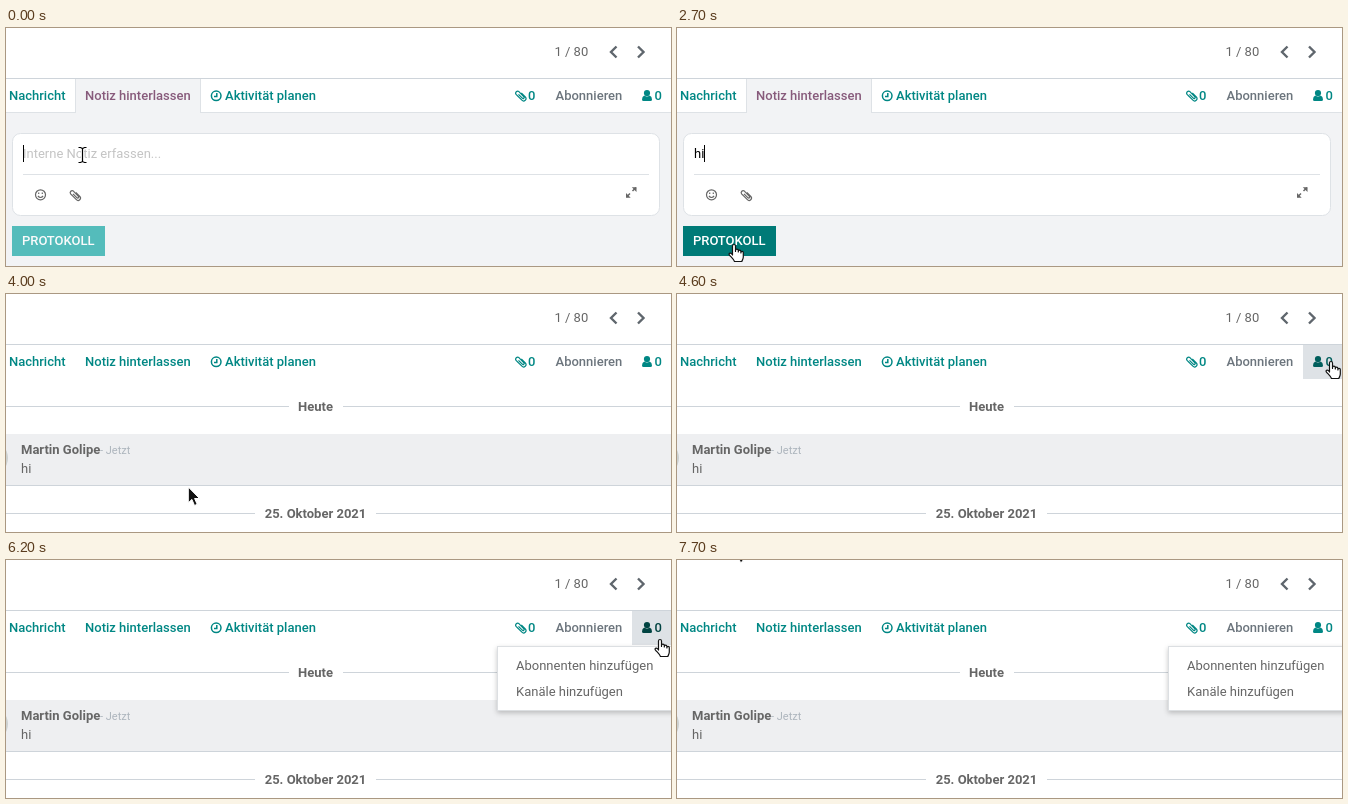
Write an HTML page that moves like this. It is 665 px wide and 238 px high and loops after 8000 ms.

```html
<!DOCTYPE html>
<html lang="de">
<head>
<meta charset="utf-8">
<title>Notiz hinterlassen</title>
<style>
  html, body { margin: 0; width: 100%; height: 100%; overflow: hidden; background: #fff; }
  svg { display: block; font: 13px Roboto, Arial, sans-serif; fill: #666; }
  .medium { font-weight: 500; }
  .bold { font-weight: 700; }
  .teal { fill: #008784; color: #008784; }
  .line { fill: #ced4da; }
  .stroke { fill: none; stroke: currentColor; stroke-width: 1.2; }
</style>
</head>
<body>
<svg width="665" height="238" viewBox="0 0 665 238">
  <defs>
    <path id="clip" class="stroke" d="M-2-1.5L2 2.5A1 1 0 0 0 3.4 1.1L-1.6-4.2A2 2 0 0 0-4.4-1.4L1.4 4.4A2.3 2.3 0 0 0 4.8 1.2L.8-2.8"/>
    <filter id="shadow" x="-10%" y="-20%" width="120%" height="150%">
      <feDropShadow dx="0" dy="2" stdDeviation="2.5" flood-opacity=".22"/>
    </filter>
  </defs>
  <rect width="665" height="238" fill="#fff"/>

  <g id="composer">
    <rect y="84" width="665" height="154" fill="#f2f3f5"/>
    <rect y="84" width="665" height="1" fill="#dee2e6"/>
    <rect x="69" y="51" width="126" height="34" fill="#dee2e6"/>
    <rect x="70" y="51" width="124" height="34" fill="#f2f3f5"/>
    <rect x="6.5" y="105.5" width="647" height="82" rx="8" fill="#fff" stroke="#dee2e6"/>
    <rect x="17" y="146" width="626" height="1" fill="#dee2e6"/>
    <text id="note" x="17" y="130"></text>
    <rect id="caret" y="117" width="1" height="17" fill="#000"/>
    <g color="#666">
      <g class="stroke" transform="translate(34.5 166.8)">
        <circle r="5"/>
        <path d="M-2.6 1.2Q0 4.2 2.6 1.2M-1.8-2.2V-.8M1.8-2.2V-.8"/>
      </g>
      <use href="#clip" x="69" y="167.3"/>
      <path class="stroke" d="M624 165.5L620.5 169M626.5 163L630 159.500" style="stroke-width:1.5"/>
      <path d="M620 165V169.700H624.7ZM630.5 164V159.300H625.8Z"/>
    </g>
    <g id="button">
      <rect id="buttonFill" x="6" y="198" width="93" height="30"/>
      <text class="medium" x="16" y="217" fill="#fff">PROTOKOLL</text>
    </g>
  </g>

  <g id="thread">
    <g class="line">
      <path d="M0 112H283V113H0ZM337 112H665V113H337Z"/>
      <path d="M0 219H249V220H0ZM370 219H665V220H370Z"/>
    </g>
    <rect y="140" width="665" height="51" fill="#eeeff1"/>
    <rect class="line" y="191" width="665" height="1"/>
    <circle cx="-15" cy="164" r="17" fill="#cdd1d0"/>
    <g class="bold">
      <text x="309.5" y="117" text-anchor="middle">Heute</text>
      <text x="15" y="160">Martin Golipe</text>
      <text x="309.5" y="224" text-anchor="middle">25. Oktober 2021</text>
    </g>
    <text x="94" y="160" font-size="11" fill="#adb5bd">- Jetzt</text>
    <text x="15" y="179">hi</text>
  </g>

  <rect class="line" y="50" width="665" height="1"/>
  <text x="548.5" y="28">1 / 80</text>
  <path class="stroke" d="M610.500 18.500L605 24L610.500 29.500M632 18.500L637.500 24L632 29.500" color="#5f666d" style="stroke-width:2.4"/>
  <g class="medium teal">
    <text x="3" y="72">Nachricht</text>
    <text id="noteTab" x="79" y="72">Notiz hinterlassen</text>
    <g class="stroke" style="stroke-width:1.5">
      <circle cx="210.200" cy="67.800" r="4.800"/>
      <path d="M210.800 65V68.500H208"/>
    </g>
    <text x="219" y="72">Aktivität planen</text>
    <use href="#clip" x="514.500" y="67.800"/>
    <text x="522" y="72">0</text>
  </g>
  <text class="medium" x="549.500" y="72" style="fill:#6c757d">Abonnieren</text>
  <rect id="hover" x="626" y="51" width="39" height="34" fill="#dee2e6"/>
  <g id="followers" class="medium">
    <circle cx="641" cy="65" r="3.100"/>
    <path d="M638.300 67.500Q641 69.500 643.700 67.500Q646 68.300 646 71.500Q646 73 644.500 73H637.500Q636 73 636 71.500Q636 68.300 638.300 67.500Z"/>
    <text x="648.500" y="72">0</text>
  </g>

  <g id="menu">
    <rect x="491.500" y="86.500" width="180" height="64" fill="#fff" stroke="#dcdfe2" filter="url(#shadow)"/>
    <text x="510" y="110">Abonnenten hinzufügen</text>
    <text x="510" y="136">Kanäle hinzufügen</text>
  </g>

  <g id="pointer">
    <g id="beam" fill="none">
      <path d="M-3.500-7.500H-1.500L.5-6.500L2.500-7.500H4.500M.5-6.500V6.500M-3.500 7.500H-1.500L.5 6.500L2.500 7.500H4.500" stroke="#fff" stroke-width="3"/>
      <path d="M-3.500-7.500H-1.500L.5-6.500L2.500-7.500H4.500M.5-6.500V6.500M-3.500 7.500H-1.500L.5 6.500L2.500 7.500H4.500" stroke="#000" stroke-width="1.200"/>
    </g>
    <path id="arrow" d="M.3 0V15.800L3.900 12.400L6.500 18.500L9.200 17.300L6.600 11.500H11.500Z" fill="#111" stroke="#fff"/>
    <path id="hand" transform="translate(-6 -1)" d="M4.500 11V2a1.500 1.500 0 0 1 3 0V7.500V6.500a1.400 1.400 0 0 1 2.800 0V8V7.500a1.300 1.300 0 0 1 2.600 0V9V8.500a1.200 1.200 0 0 1 2.400 0V13c0 2-1 3-1.500 4.500H6.500C5.500 15 3 13 1.300 10.800c-.9-1.200.9-2.400 2-1.300Z" fill="#fff" stroke="#111" stroke-width="1.200" stroke-linejoin="round"/>
  </g>
</svg>
<script>
const LOOP = 8000, STEP = 100, POSTED = 3400, MENU_OPEN = 6200;
const el = id => document.getElementById(id);
const show = (id, on) => { el(id).style.display = on ? "" : "none"; };

// Keys are [time, value, ...]; values are interpolated linearly.
function track(t, keys) {
  const i = keys.findIndex(k => k[0] > t);
  if (i < 0) return keys[keys.length - 1].slice(1);
  if (i === 0) return keys[0].slice(1);
  const a = keys[i - 1], b = keys[i], p = (t - a[0]) / (b[0] - a[0]);
  return a.slice(1).map((v, n) => v + (b[n + 1] - v) * p);
}

const pointerPath = [
  [2100, 76, 127], [2400, 68, 172], [2700, 57, 217],
  [3900, 57, 217], [4000, 182, 193], [4300, 500, 110], [4600, 653.5, 68], [4800, 653.5, 69],
  [5400, 653.5, 69], [5700, 653.5, 81], [5800, 653.5, 81], [5900, 653.5, 80],
  [6500, 653.5, 80], [6700, 620, 118], [6900, 540, 143], [7100, 370, 112],
  [7400, 84, 20], [7700, 57, -16]
];
const buttonOpacity = [[700, .65], [1000, 1], [2900, 1], [3300, .65]];
const buttonShade = [[2400, 0], [2700, 1], [2900, 1], [3200, 0]];
const hoverOpacity = [[4400, 0], [4600, 1], [6500, 1], [6800, 0]];
const followerShade = [[4400, 0], [4600, .6], [4800, .6], [5000, 1], [6500, 1], [6800, 0]];

function pointerKind(t, x, y) {
  const posted = t >= POSTED;
  if (!posted && y > 105 && y < 147) return "beam";
  const onButton = t < 3000 && y >= 198;
  const onFollowers = x >= 626 && y >= 51 && y < 85;
  const onMenu = t >= MENU_OPEN && x >= 491 && y >= 85 && y < 150;
  return onButton || onFollowers || onMenu ? "hand" : "arrow";
}

function render(t) {
  const posted = t >= POSTED;
  show("composer", !posted);
  show("thread", posted);
  show("menu", t >= MENU_OPEN);
  el("noteTab").style.fill = posted ? "" : "#875a7b";

  const typed = t < 800 ? "" : t < 900 ? "h" : "hi";
  el("note").textContent = typed || "Interne Notiz erfassen...";
  el("note").style.fill = typed ? "#000" : "#c4c4c4";
  el("caret").setAttribute("x", [17, 24, 27][typed.length]);
  show("caret", t < 2100 || t >= 2600);

  const [shade] = track(t, buttonShade);
  el("buttonFill").style.fill = `rgb(0,${160 - 38 * shade},${157 - 38 * shade})`;
  el("button").style.opacity = track(t, buttonOpacity)[0];

  el("hover").style.opacity = track(t, hoverOpacity)[0];
  const [dark] = track(t, followerShade);
  el("followers").style.fill = `rgb(0,${135 - 68 * dark},${132 - 67 * dark})`;

  const [x, y] = track(t, pointerPath);
  const kind = pointerKind(t, x, y);
  for (const id of ["beam", "arrow", "hand"]) show(id, id === kind);
  el("pointer").setAttribute("transform", `translate(${Math.round(x)} ${Math.round(y)})`);
}

const start = performance.now();
function tick() {
  const t = (performance.now() - start) % LOOP;
  render(Math.floor(t / STEP) * STEP);
  requestAnimationFrame(tick);
}
tick();
</script>
</body>
</html>
```
